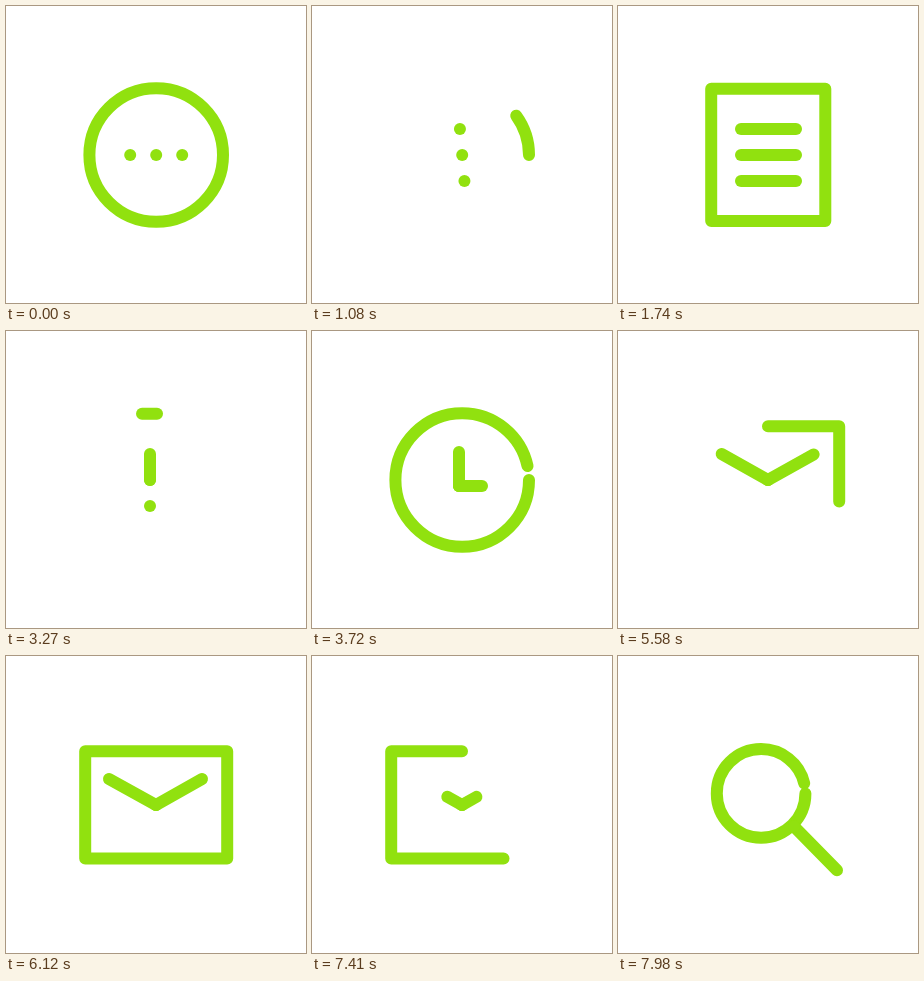
Animation of 300 by 297 pixels, one loop 8 s. Source, as an HTML page with a canvas:

```html
<!DOCTYPE html>
<html lang="en">
<head>
<meta charset="utf-8">
<title>Icon morph</title>
<style>
  html, body { margin: 0; width: 100%; height: 100%; overflow: hidden; background: #fff; }
  canvas { display: block; width: 100vw; height: 100vh; }
</style>
</head>
<body>
<canvas id="stage" width="300" height="297"></canvas>
<script>
const ctx = document.getElementById('stage').getContext('2d');
const LOOP = 8000;
const GREEN = '#91e10f';

const clamp = v => Math.min(1, Math.max(0, v));
const ease = v => {
  v = clamp(v);
  return v < 0.5 ? 4 * v ** 3 : 1 - 4 * (1 - v) ** 3;
};
const mix = (a, b, k) => a + (b - a) * k;

// Outlines run clockwise from a start point near the top centre.
function circle(cx, cy, r, startX) {
  const a = -Math.acos((startX - cx) / r);
  const path = new Path2D();
  path.arc(cx, cy, r, a, a + Math.PI * 2);
  path.closePath();
  return { path, length: Math.PI * 2 * r, x: startX, y: cy + r * Math.sin(a) };
}

function box(left, top, right, bottom, startX) {
  const path = new Path2D();
  path.moveTo(startX, top);
  path.lineTo(right, top);
  path.lineTo(right, bottom);
  path.lineTo(left, bottom);
  path.lineTo(left, top);
  path.closePath();
  return { path, length: 2 * (right - left + bottom - top), x: startX, y: top };
}

const ring = circle(150.2, 149, 66.8, 151.5);
const sheet = box(93.2, 82.8, 207.3, 215, 151);
const envelope = box(79.2, 95.2, 221.2, 202.4, 150);
const lens = circle(143.1, 137.4, 44.3, 141);

// Each change wipes one outline away, then draws the next.
const changes = [
  { from: ring, to: sheet, wipe: 735, wipeTime: 490, draw: 1180 },
  { from: sheet, to: ring, wipe: 2895, wipeTime: 468, draw: 3340 },
  { from: ring, to: envelope, wipe: 4935, wipeTime: 480, draw: 5380 },
  { from: envelope, to: lens, wipe: 7185, wipeTime: 480, draw: 7603 }
];
const DRAW_TIME = 480;

// Strokes inside the outline: three segments of x1, y1, x2, y2.
const dot = (x, y) => [x, y, x, y];
const rows = (x1, x2) => [123, 149, 175].map(y => [x1, y, x2, y]);
const clock = [[147, 121, 147, 155], dot(147, 155), [147, 155, 170, 155]];
const flap = [[103, 123, 150, 149], dot(150, 149), [150, 149, 196, 123]];
const point = [dot(150, 149), dot(150, 149), dot(150, 149)];
const handle = [[176, 170.5, 219, 214.3], dot(176, 170.5), dot(176, 170.5)];
const poses = [
  [1190, rows(150, 150)],
  [1740, rows(123, 178)],
  [2895, rows(123, 178)],
  [3140, rows(145, 145)],
  [3270, [[144, 123, 144, 149], dot(144, 149), dot(144, 175)]],
  [3700, clock],
  [4935, clock],
  [5700, flap],
  [7185, flap],
  [7580, point],
  [7890, handle]
];

function trim(shape, a, b, dx, dy) {
  ctx.save();
  ctx.translate(dx, dy);
  if (b - a < 1) {
    const { length } = shape;
    ctx.setLineDash([Math.max(0.01, (b - a) * length), length * 2]);
    ctx.lineDashOffset = -a * length;
  }
  ctx.stroke(shape.path);
  ctx.restore();
}

function drawOutline(t) {
  const c = changes.filter(s => t >= s.wipe).pop();
  if (!c) return trim(ring, 0, 1, 0, 0);
  const k = ease((t - c.draw + 90) / 180);
  const dx = c.to.x - c.from.x;
  const dy = c.to.y - c.from.y;
  if (t < c.draw) {
    trim(c.from, ease((t - c.wipe) / c.wipeTime), 1, dx * k, dy * k);
  } else {
    trim(c.to, 0, ease((t - c.draw) / DRAW_TIME), dx * (k - 1), dy * (k - 1));
  }
}

function marks(t) {
  if (t < poses[0][0]) {
    const a = Math.PI / 2 * ease((t - 735) / 455);
    return [-26, 0, 26].map(d => dot(150.2 + d * Math.cos(a), 149 + d * Math.sin(a)));
  }
  const i = poses.findIndex(p => p[0] > t);
  if (i < 0) return poses[poses.length - 1][1];
  const [t0, a] = poses[i - 1];
  const [t1, b] = poses[i];
  const k = ease((t - t0) / (t1 - t0));
  return a.map((seg, s) => seg.map((v, n) => mix(v, b[s][n], k)));
}

function render() {
  const t = performance.now() % LOOP;
  ctx.fillStyle = '#fff';
  ctx.fillRect(0, 0, 300, 297);
  ctx.strokeStyle = GREEN;
  ctx.lineWidth = 12;
  ctx.lineCap = ctx.lineJoin = 'round';
  drawOutline(t);
  for (const [x1, y1, x2, y2] of marks(t)) {
    ctx.beginPath();
    ctx.moveTo(x1, y1);
    ctx.lineTo(x2 + 0.01, y2);
    ctx.stroke();
  }
  requestAnimationFrame(render);
}
render();
</script>
</body>
</html>
```
